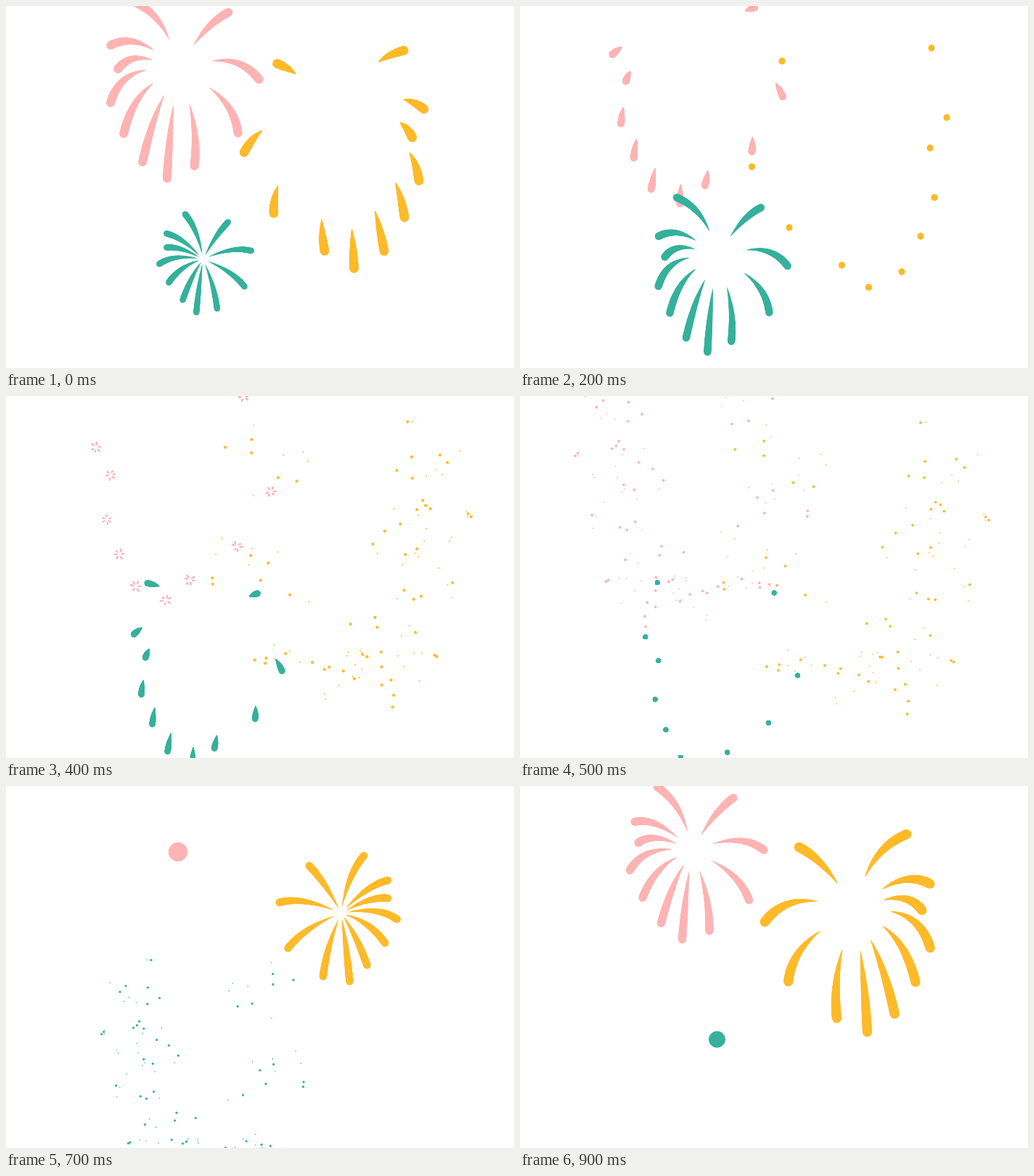
Recreate the animation shown at these times as an HTML page with a canvas. Size 700 by 500 pixels, loop 1 s.

```html
<!DOCTYPE html>
<html lang="en">
<head>
<meta charset="utf-8">
<title>Fireworks</title>
<style>
html, body { margin: 0; width: 100%; height: 100%; overflow: hidden; background: #fff; }
canvas { display: block; }
</style>
</head>
<body>
<canvas id="stage" width="700" height="500"></canvas>
<script>
const ctx = document.getElementById('stage').getContext('2d');
const STEP = 100, STEPS = 10, TAU = 2 * Math.PI;

// The same burst shown three times; a negative width mirrors it.
const bursts = [
  { x: 237, y: 91, sx: -.898, sy: .898, color: '#ffb3b3', start: 7 },
  { x: 461.7, y: 176, sx: 1, sy: 1, color: '#ffba29', start: 6 },
  { x: 271.5, y: 350, sx: -.781, sy: .781, color: '#36b19c', start: 9 }
];

// Each ray flies from the centre along a quadratic curve: bend, then end.
const centre = { x: 461.7, y: 176 };
const rays = [
  [418,88, 361,76], [478,68, 567,58], [535,94, 588,154], [545,125, 565,196],
  [568,153, 571,264.5], [543,195, 552,318], [505,235, 526,367], [477,270, 480.5,388.5],
  [420,270, 443.5,358], [355,215, 371,306], [354,125, 319.5,222]
].map(([bx, by, x, y]) => ({ bx, by, x, y }));

function disc(x, y, r) {
  ctx.beginPath();
  ctx.arc(x, y, r, 0, TAU);
  ctx.fill();
}

function seeded(seed) {
  return () => (seed = seed * 16807 % 2147483647) / 2147483647;
}

// A run of discs that swells from a thin tail to a round head.
function taper(pointAt, r) {
  for (let i = 0; i <= 80; i++) {
    const u = i / 80;
    disc(...pointAt(u), r * (.1 + .9 * Math.sin(u * TAU / 4)));
  }
}

// The part of every ray between two fractions of its flight.
const streaks = (tail, head, r) => () => {
  for (const ray of rays) {
    taper(u => {
      const t = tail + (head - tail) * u;
      const a = (1 - t) ** 2, b = 2 * t * (1 - t), c = t * t;
      return [a * centre.x + b * ray.bx + c * ray.x, a * centre.y + b * ray.by + c * ray.y];
    }, r);
  }
};

function stars() {
  const random = seeded(31);
  for (const { x, y } of rays) {
    const turn = random() * TAU;
    for (let k = 0; k < 6; k++) {
      const a = turn + (k + random() * .5) * TAU / 6, far = 6 + 2.5 * random();
      taper(u => {
        const d = 3 + (far - 3) * u;
        return [x + d * Math.cos(a), y + d * Math.sin(a)];
      }, 1);
    }
  }
}

// Alternately large and fine sparks around each ray's end.
const sparks = (spread, drop, large, fine) => () => {
  const random = seeded(77);
  for (const { x, y } of rays) {
    for (let k = 0; k < 10; k++) {
      const a = random() * TAU, d = spread * Math.sqrt(random());
      disc(x + d * Math.cos(a), y + drop + d * Math.sin(a), k % 2 ? large : fine);
    }
  }
};

const phases = [
  () => disc(centre.x, centre.y, 14.7),
  streaks(.05, .47, 5.2),
  streaks(.16, .66, 6.2),
  streaks(.27, .79, 6.6),
  streaks(.65, .89, 6.2),
  streaks(.83, .96, 5.4),
  streaks(1, 1, 4.2),
  stars,
  sparks(60, 6, 2.1, 1),
  sparks(66, 10, 1.9, .9)
];

function draw(time) {
  const step = Math.floor(time / STEP);
  ctx.resetTransform();
  ctx.clearRect(0, 0, 700, 500);
  for (const { x, y, sx, sy, color, start } of bursts) {
    ctx.setTransform(sx, 0, 0, sy, x, y);
    ctx.translate(-centre.x, -centre.y);
    ctx.fillStyle = color;
    phases[(step - start + STEPS) % STEPS]();
  }
}

const begin = performance.now();
function frame(now) {
  draw(Math.max(0, now - begin) % (STEP * STEPS));
  requestAnimationFrame(frame);
}
frame(begin);
</script>
</body>
</html>
```
